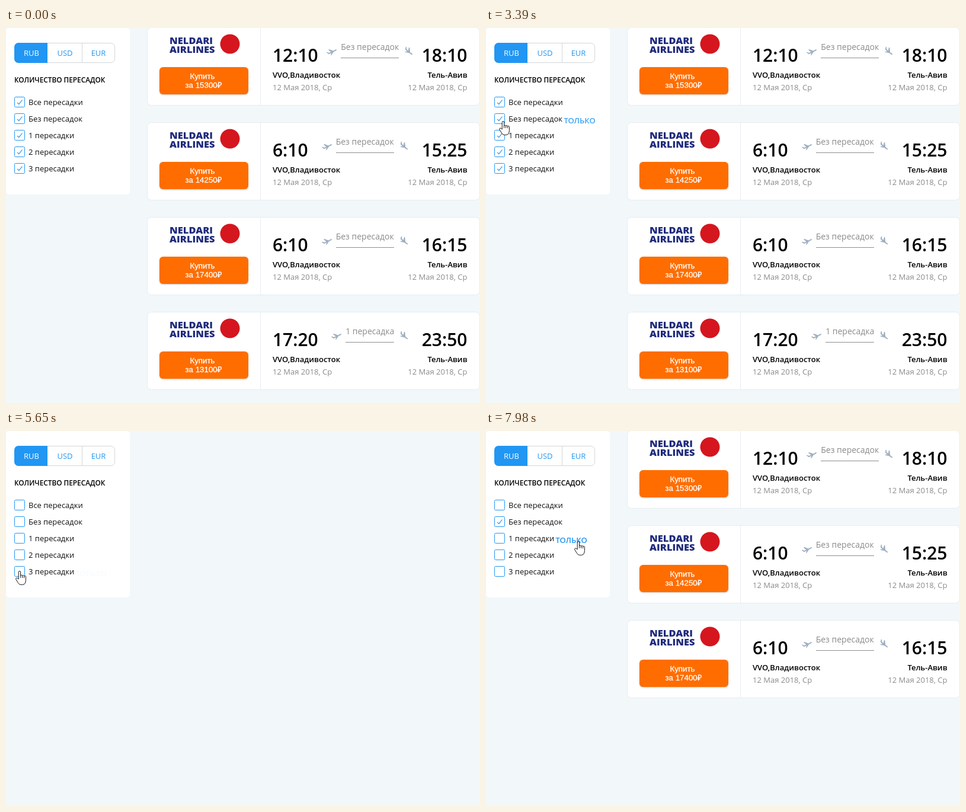
Animation, 800 px wide and 633 px high, one loop 8 s. Source, as an HTML page:

```html
<!DOCTYPE html>
<html lang="ru">
<head>
<meta charset="utf-8">
<title>Билеты</title>
<style>
  html, body { margin: 0; width: 100%; height: 100%; overflow: hidden; background: #f2f7fa; }
  svg { display: block; }
  text { font: 13px "Open Sans", sans-serif; fill: #111; }
  .heading, .city, .only, .time { font-weight: 600; fill: #000; }
  .heading { font-size: 11.8px; }
  .blue, .only { fill: #2196f3; }
  .white { fill: #fff; }
  .mid { text-anchor: middle; }
  .end { text-anchor: end; }
  .brand { font-size: 16.5px; font-weight: 800; fill: #1f2a7c; }
  .buy { font: 13.33px "Liberation Sans", Arial, sans-serif; fill: #fff; stroke: #fff; stroke-width: .3; }
  .time { font-size: 30px; }
  .grey { fill: #8b8b8b; }
  .stops { font-size: 14px; }
  .plane { fill: #9fb0c1; }
  .box { fill: #fff; stroke: #2196f3; }
  .tick { fill: none; stroke: #2f8fd6; stroke-width: 1.2; }
  .pointer { fill: #fff; stroke: #111; stroke-linejoin: round; }
  .button { fill: #ff6d00; filter: drop-shadow(0 1px 1px rgba(0, 0, 0, .22)); }
</style>
</head>
<body>
<svg width="800" height="633" viewBox="0 0 800 633">
  <g id="cards"></g>
  <rect width="209" height="281" rx="5" fill="#fff"/>
  <rect x="14.5" y="25.5" width="169" height="33" rx="6.5" fill="#fff" stroke="#d3d6da"/>
  <path d="M128.5 26V58" stroke="#d3d6da"/>
  <path d="M70 25V59H21a7 7 0 0 1-7-7V32a7 7 0 0 1 7-7z" fill="#2196f3"/>
  <text class="mid white" x="43" y="47">RUB</text>
  <text class="mid blue" x="99.5" y="47">USD</text>
  <text class="mid blue" x="156" y="47">EUR</text>
  <text class="heading" x="14" y="92">КОЛИЧЕСТВО ПЕРЕСАДОК</text>
  <g id="rows"></g>
  <g id="cursor">
    <path id="arrow" class="pointer" d="M.5.5v16l3.8-3.6 2.6 6 2.4-1-2.6-5.9h5.3z"/>
    <g id="hand" class="pointer">
      <path d="M5.2 14V2.2a1.7 1.7 0 0 1 3.4 0V8.4a1.5 1.5 0 0 1 3 .4a1.5 1.5 0 0 1 3 .7a1.4 1.4 0 0 1 2.8 .8V15.5q0 8-6 8h-2q-3.5 0-5-3.2L.9 14.6a1.6 1.6 0 0 1 1.2-2.6q1.6 0 3.1 2z"/>
      <path fill="none" d="M8.6 8.4v3.4M11.6 9v3M14.6 9.6v2.6"/>
    </g>
  </g>
</svg>
<script>
const LOOP = 8000, TICK = 10, UPDATE = 78, FADE = 300;
const ROW_TOP = 116, ROW_STEP = 28, TIP = 6, ONLY_X = 116, PANEL_END = 185;
const ALL = [1, 2, 3, 4];
const $ = id => document.getElementById(id);

// Pointer moves: start, end, and the left and top it comes to rest at.
const entry = { x: 1277, y: 926 };
const moves = [
  [70, 210, 392, 480], [360, 1140, 16, 149], [1200, 1200, 16, 145], [1600, 1900, 15, 131],
  [2760, 2920, 14, 131], [3140, 3390, 22, 157], [3620, 4400, 22, 200], [4470, 4710, 22, 209],
  [4880, 5342, 10, 236], [5419, 5650, 16, 236], [5720, 6110, 22, 129],
  [6800, 7350, 143, 161], [7500, 7980, 149, 186]
];
const clicks = [1750, 2760, 3620, 4166, 4880, 5342, 6340, 7500];

const tickets = [
  "12:10 18:10 0 15300", "6:10 15:25 0 14250", "6:10 16:15 0 17400",
  "17:20 23:50 1 13100", "17:10 23:45 1 13600", "16:50 23:35 1 16700",
  "17:00 23:30 2 11000", "16:20 22:10 3 12400", "12:10 20:15 3 13400", "9:40 19:25 3 12450"
].map(s => s.split(" "));
const stopNames = ["Без пересадок", "1 пересадка", "2 пересадки", "3 пересадки"];
const rowNames = ["Все пересадки", "Без пересадок", "1 пересадки", "2 пересадки", "3 пересадки"];
const plane = "M0 6.5H2.5L4.5 8 8 6.8 3.8 2.8 5.5 2.2 12 5.2 15.8 3.6Q17.8 3 17.9 4.2 17.8 5 16.2 5.7L12.5 7.2 8.5 12 6.8 12.5 8.5 8.8 4 10.2z";

const text = (cls, x, y, s) => `<text class="${cls}" x="${x}" y="${y}">${s}</text>`;

$("rows").innerHTML = rowNames.map((name, i) => `<g transform="translate(0 ${ROW_STEP * i})">
  <rect class="box" x="14.5" y="116.5" width="17" height="17" rx="2"/>
  <path class="tick" d="M19 125.8l2.8 2.9 5.6-7.2"/>
  ${text("", 38, 130, name)}
  ${i ? text("only", i > 1 ? 117.5 : 131.5, 133, "ТОЛЬКО") : ""}</g>`).join("");
const tickMarks = document.querySelectorAll(".tick");
const onlyLabels = document.querySelectorAll(".only");

function card([from, to, stops, price], i) {
  return `<g class="card" transform="translate(0 ${160 * i})">
    <rect x="238.5" y="-.5" width="561" height="131" rx="7" fill="#fff" stroke="#e6ecf1"/>
    <path d="M429.5 0V130" stroke="#e6ecf1"/>
    ${text("brand", 276, 26.5, "NELDARI")}${text("brand", 276, 41.5, "AIRLINES")}
    <circle cx="378" cy="27" r="16.5" fill="#d5161e"/>
    <rect class="button" x="259" y="66" width="150" height="46" rx="6"/>
    ${text("buy mid", 331.5, 86, "Купить")}${text("buy mid", 333.5, 101, `за ${price}₽`)}
    ${text("time from", 450, 57, from)}${text("time end to", 778.5, 57, to)}
    ${text("city", 450, 84, "VVO,Владивосток")}${text("city end", 778.5, 84, "Тель-Авив")}
    ${text("grey", 450, 105, "12 Мая 2018, Ср")}${text("grey end", 778.5, 105, "12 Мая 2018, Ср")}
    ${text("grey stops mid", 0, 37, stopNames[stops])}
    <path class="rule" stroke="#8f8f8f"/>
    <path class="plane" d="${plane}"/><path class="plane" d="${plane}"/></g>`;
}

// Centres the stops label in the gap between the two times.
function alignStops(g) {
  const find = s => g.querySelector(s);
  const width = s => find(s).getComputedTextLength();
  const mid = (450 + width(".from") + 778.5 - width(".to")) / 2;
  const half = width(".stops") / 2;
  const left = Math.round(mid - half), right = Math.round(mid + half);
  find(".stops").setAttribute("x", mid);
  find(".rule").setAttribute("d", `M${left} 50.5H${right}`);
  const [up, down] = g.querySelectorAll(".plane");
  up.setAttribute("transform", `translate(${left - 24.5} 33.5) rotate(-6 9 7)`);
  down.setAttribute("transform", `translate(${right + 7} 32) rotate(60 9 7)`);
}

// The screen refreshes in even steps, so each move is an eased path sampled at them.
function pointerAt(t) {
  let { x, y } = entry;
  for (const [start, end, toX, toY] of moves) {
    if (t < start) break;
    const gaps = Math.round((end - start) / UPDATE);
    const done = gaps ? Math.floor((t - start) / (end - start) * gaps + 1e-6) : 0;
    const p = Math.min(1, (done + 1) / (gaps + 1));
    const eased = 1 - (1 - p) ** 3;
    x += (toX - x) * eased;
    y += (toY - y) * eased;
  }
  return { x, y };
}

const rowAt = y => Math.floor((y - ROW_TOP) / ROW_STEP);

function click(chosen, { x, y }) {
  const row = rowAt(y);
  if (row === 0) return chosen.length === ALL.length ? [] : ALL;
  if (x + TIP > ONLY_X) return [row];
  return chosen.includes(row) ? chosen.filter(r => r !== row) : [...chosen, row];
}

// Plays the session once; every moment of the loop is then looked up by time.
function playSession() {
  const moments = [];
  let chosen = ALL, glow = ALL.map(() => 0);
  for (let t = 0; t < LOOP; t += TICK) {
    const at = pointerAt(t), row = rowAt(at.y), tip = at.x + TIP;
    if (clicks.some(c => c >= t && c < t + TICK)) chosen = click(chosen, at);
    const hovered = tip >= 22 && tip <= PANEL_END ? row : -1;
    glow = glow.map((v, i) =>
      Math.max(0, Math.min(1, v + (hovered === i + 1 ? TICK : -TICK) / FADE)));
    const overRow = tip >= 14 && tip <= PANEL_END && row >= 0 && row < rowNames.length;
    moments.push({ at, chosen, glow, overRow, visible: t >= moves[0][0] });
  }
  return moments;
}

let shown = null;
function showTickets(chosen) {
  if (chosen === shown) return;
  shown = chosen;
  const list = tickets.filter(t => chosen.includes(+t[2] + 1)).slice(0, 4);
  $("cards").innerHTML = list.map(card).join("");
  document.querySelectorAll(".card").forEach(alignStops);
  tickMarks.forEach((mark, i) => {
    const on = i ? chosen.includes(i) : chosen.length === ALL.length;
    mark.style.display = on ? "" : "none";
  });
}

function draw({ at, chosen, glow, overRow, visible }) {
  showTickets(chosen);
  onlyLabels.forEach((label, i) => label.setAttribute("opacity", glow[i]));
  $("cursor").style.display = visible ? "" : "none";
  $("cursor").setAttribute("transform", `translate(${Math.round(at.x)} ${Math.round(at.y)})`);
  $("arrow").style.display = overRow ? "none" : "";
  $("hand").style.display = overRow ? "" : "none";
}

const moments = playSession();
const start = performance.now();
function frame() {
  const now = Math.max(0, performance.now() - start) % LOOP;
  draw(moments[Math.floor(now / TICK)]);
  requestAnimationFrame(frame);
}
frame();
</script>
</body>
</html>
```
